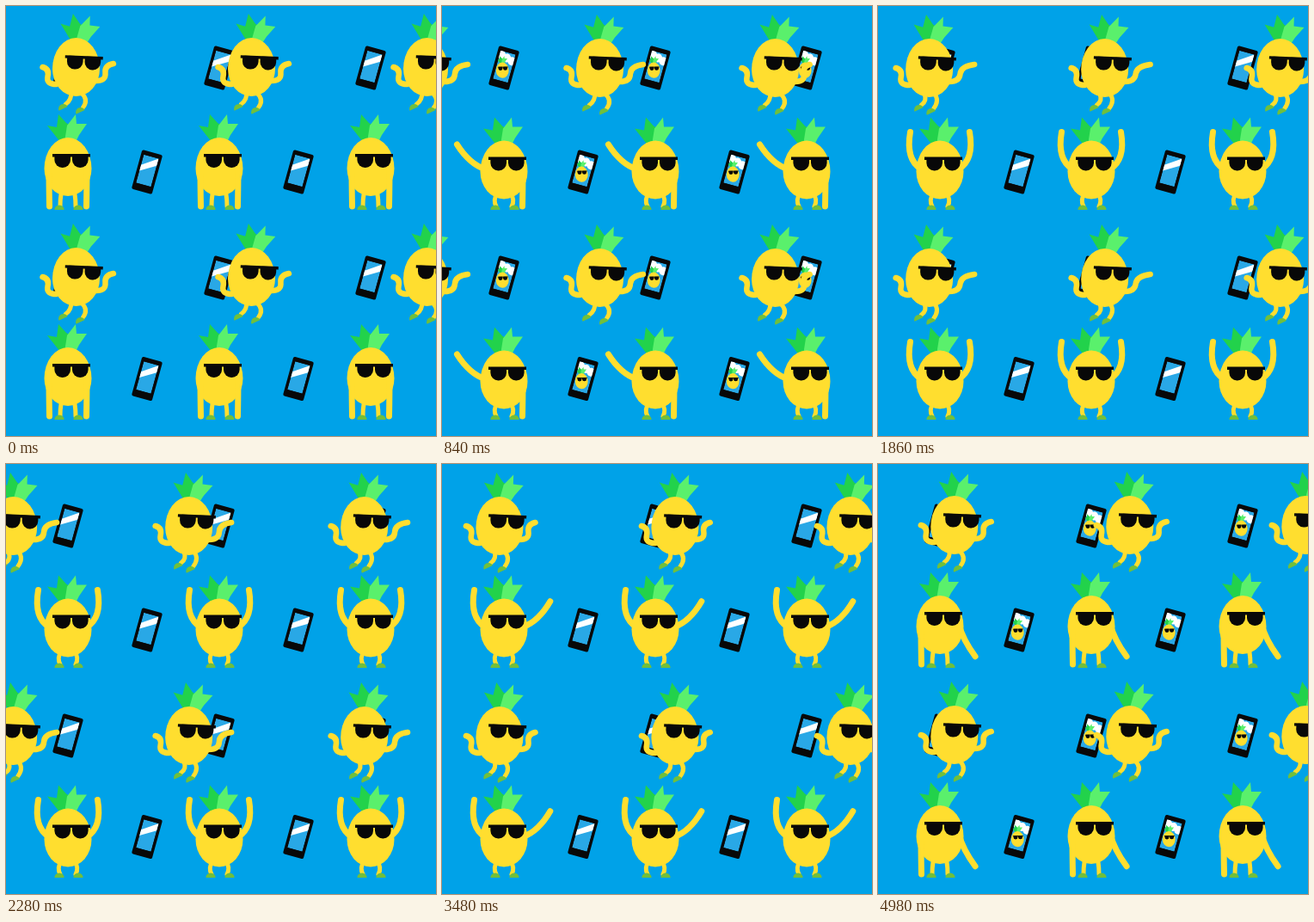
These frames come from a looping animation (500 px wide and 500 px high, 5.04 s). An HTML page with a canvas:

```html
<!DOCTYPE html>
<html lang="en">
<head>
<meta charset="utf-8">
<title>Dancing pineapples</title>
<style>
html, body { margin: 0; width: 100%; height: 100%; overflow: hidden; background: #00a2e8; }
canvas { display: block; width: 500px; height: 500px; }
</style>
</head>
<body>
<canvas id="stage" width="500" height="500"></canvas>
<script>
const ctx = document.getElementById('stage').getContext('2d');
const LOOP = 5040, STEP = 60, BAR = LOOP / 3, GAP = 204, COLUMN = 176, ROW = 244;
const SKY = '#00a2e8', YELLOW = '#ffde2f', INK = '#080808';
const LEAF_DARK = '#22d24b', LEAF_LIGHT = '#5af06c', SHOE = '#70bf3c';

const clamp = v => Math.min(1, Math.max(0, v));
const wave = (t, period, peak) => .5 + .5 * Math.cos((t - peak) / period * Math.PI * 2);

// First half of each bar: knees bent
const isLow = t => t % BAR > 0 && t % BAR <= BAR / 2;

function at(x, y, draw, angle = 0, scale = 1) {
  ctx.save();
  ctx.translate(x, y);
  ctx.rotate(angle);
  ctx.scale(scale, scale);
  draw();
  ctx.restore();
}

function poly(color, ...points) {
  ctx.fillStyle = color;
  ctx.beginPath();
  points.forEach(([x, y]) => ctx.lineTo(x, y));
  ctx.fill();
}

function oval(color, x, y, rx, ry, from = 0, to = Math.PI * 2) {
  ctx.fillStyle = color;
  ctx.beginPath();
  ctx.ellipse(x, y, rx, ry, 0, from, to);
  ctx.fill();
}

// Smooth line that bends near each inner point
function limb(width, ...points) {
  ctx.strokeStyle = YELLOW;
  ctx.lineWidth = width;
  ctx.lineCap = 'round';
  ctx.beginPath();
  ctx.moveTo(...points[0]);
  const last = points.length - 1;
  for (let i = 1; i < last; i++) {
    const [x, y] = points[i], [nx, ny] = points[i + 1];
    const mix = i === last - 1 ? 1 : .5;
    ctx.quadraticCurveTo(x, y, x + (nx - x) * mix, y + (ny - y) * mix);
  }
  ctx.stroke();
}

function crown() {
  poly(LEAF_DARK, [-9, -29], [-24, -48], [-13, -46], [-11, -61], [-2, -51], [6, -46], [6, -29]);
  poly(LEAF_LIGHT, [-4, -29], [-1, -48], [9, -61], [10, -50], [22, -50], [13, -37], [9, -29]);
}

function body() {
  ctx.fillStyle = YELLOW;
  ctx.beginPath();
  ctx.ellipse(0, 2, 27.5, 36, 0, Math.PI, 0);
  ctx.ellipse(0, 2, 27.5, 32, 0, 0, Math.PI);
  ctx.fill();
}

function glasses(x, y, tilt = 0) {
  at(x, y, () => {
    ctx.fillStyle = INK;
    ctx.fillRect(-22, -8, 44, 3.5);
    for (const side of [-1, 1]) {
      ctx.beginPath();
      ctx.roundRect(side * 10.3 - 9.3, -7.5, 18.6, 15.5, [3, 3, 9, 9]);
      ctx.fill();
    }
  }, tilt);
}

function shoe(x, y, side, angle = 0) {
  at(x, y, () => oval(SHOE, side, 0, 5.6, 5.5, Math.PI, 0), angle);
}

function phone(x, y, taken) {
  at(x, y, () => {
    ctx.fillStyle = INK;
    ctx.beginPath();
    ctx.roundRect(-12.3, -23.5, 24.6, 47, 2);
    ctx.fill();
    ctx.beginPath();
    ctx.rect(-9, -18.5, 18, 34);
    ctx.clip();
    ctx.fillStyle = '#29a8e6';
    ctx.fillRect(-9, -18.5, 18, 34);
    if (!taken) {
      poly('#fff', [-9, -6], [9, -18.5], [9, -10], [-9, 1]);
      return;
    }
    for (let i = 0; i < 3; i++) oval('#fff', -7 + i * 7, -14 + i * 2, 5, 5);
    at(-1, 3, () => { crown(); body(); glasses(2, -7); }, -.28, .27);
  }, .27);
}

// Quick rise at start, then a steady fall between two times
const swing = (t, start, fall, end) =>
  clamp((t - start) / 160) * clamp((end - t) / (end - fall));

const lift = {
  '-1': t => Math.max(swing(t, 0, 540, BAR), swing(t, BAR, 3480, 4200)),
  '1': t => Math.max(swing(t, BAR, 2400, BAR * 2), swing(t, BAR * 2, 3950, 5250))
};

function dancer(x, y, t) {
  const low = isLow(t), dip = low ? 3.5 : 0;
  const beat = t % BAR;
  const look = beat > BAR / 2 && beat < 1560 ? -6 : 4;
  at(x, y, () => {
    for (const side of [-1, 1]) {
      limb(5, [side * 8, 32], [side * (low ? 13 : 9), 38], [side * 9, 46]);
      shoe(side * 10 + 1, 50, side);
    }
    ctx.translate(0, dip);
    crown();
    body();
    for (const side of [-1, 1]) {
      const raise = lift[side](t), angle = raise * Math.PI;
      const sin = Math.sin(angle), cos = Math.cos(angle), up = (1 - cos) / 2;
      const drop = raise ? 0 : dip;
      limb(7,
        [side * 22, -1],
        [side * (22 + 4 * sin + 18 * up), 4 + 16 * cos],
        [side * (21.5 + 30 * sin + 13 * up), 1 + 45 * cos - drop]);
    }
    glasses(look, -7);
  });
}

// Forearm bent upwards, hand turned out; reach stretches it
function bentArm(side, y, reach) {
  const points = [[23, 16], [35, 16], [31 + 6 * reach, -2], [39 + 14 * reach, -4]];
  limb(6.5, ...points.map(([px, py]) => [side * px, py + y]));
}

function walker(x, y, t, reach) {
  at(x, y + (isLow(t) ? 1 : 0), () => {
    for (const side of [-1, 1]) {
      const stride = wave(t, BAR / 4, 0);
      const fx = -4 + side * (7 + 3 * stride), fy = 47 + side * 2;
      limb(5, [side * 6, 30], [fx + 9, 38], [fx + 2, fy - 2]);
      shoe(fx, fy + 3, -1, -.45);
    }
    bentArm(-1, 4, 0);
    bentArm(1, 0, reach);
    at(0, 0, crown, .12);
    body();
    glasses(9, -5, .04);
  });
}

function draw(t) {
  ctx.fillStyle = SKY;
  ctx.fillRect(0, 0, 500, 500);
  const taken = t % BAR >= BAR / 2;
  const span = GAP * 3;
  for (let row = 0; row < 2; row++) {
    const y = row * ROW;
    for (let i = 0; i < 3; i++) phone(72 + i * COLUMN, 72 + y, taken);
    for (let i = 0; i < 3; i++) {
      const x = 81.5 + GAP * (i - t / BAR);
      const reach = i < 2 ? wave(t, LOOP, 1560) : wave(t, LOOP / 2, 1860);
      walker((x + 60 + span) % span - 60, 71 + y, t, reach);
    }
    for (let i = 0; i < 2; i++) phone(164 + i * COLUMN, 193 + row * 240.5, taken);
    for (let i = 0; i < 3; i++) dancer(72 + i * COLUMN, 187 + y, t);
  }
}

const start = performance.now();
function frame() {
  const t = (performance.now() - start) % LOOP;
  draw(Math.floor(t / STEP) * STEP);
  requestAnimationFrame(frame);
}
frame();
</script>
</body>
</html>
```
